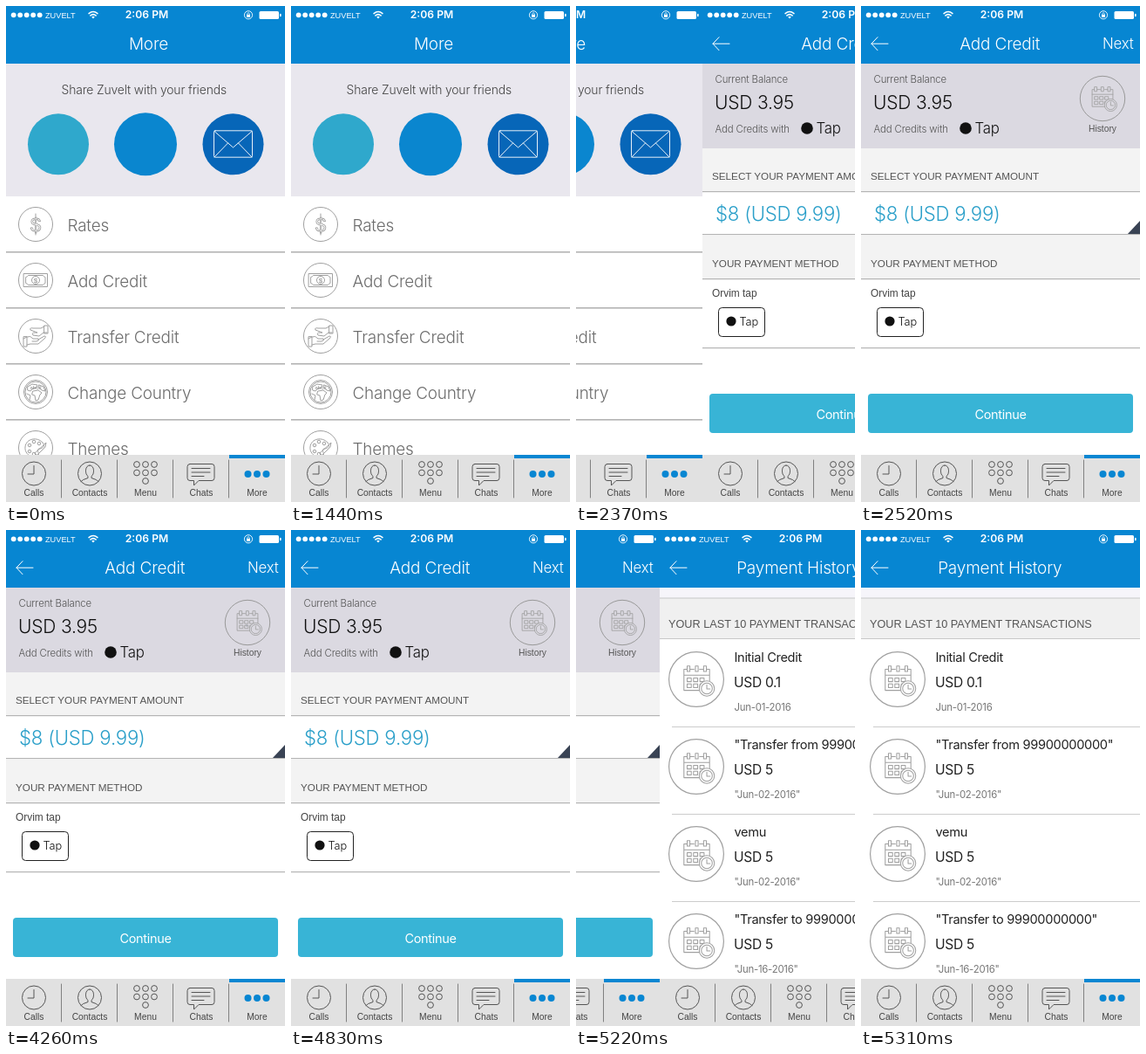
Recreate the animation shown at these times as an HTML page. Size 320x568 px, loop 8100 ms.

```html
<!DOCTYPE html>
<html lang="en">
<head>
<meta charset="utf-8">
<title>Adding credit in a calling app</title>
<style>
  html, body { margin: 0; width: 100%; height: 100%; overflow: hidden; background: #fff; }
  svg { display: block; width: 100%; height: 100%; }
  text { font-family: "Liberation Sans", Arial, sans-serif; fill: #555; }
  .light, .plain { font-family: Inter, "Liberation Sans", sans-serif; font-weight: 300; letter-spacing: -.01em; }
  .plain { font-weight: 400; letter-spacing: -.022em; }
  .line { fill: none; stroke: #a0a0a0; stroke-width: 1; stroke-linejoin: round; stroke-linecap: round; }
</style>
</head>
<body>
<svg viewBox="0 0 320 568">
  <g id="strip"></g>
  <circle id="tap" fill="#999ca3"/>
</svg>
<script>
const LOOP = 8100, STEP = 30, WIDTH = 320, HEADER = 66;
const BLUE = '#0786d2', PANEL = '#e9e7ee', SECTION = '#f3f3f3', RULE = '#b4b4b4';

const rect = (x, y, w, h, fill, more = '') =>
  `<rect x="${x}" y="${y}" width="${w}" height="${h}" fill="${fill}" ${more}/>`;
const dot = (x, y, r, fill, more = '') =>
  `<circle cx="${x}" cy="${y}" r="${r}" fill="${fill}" ${more}/>`;
const ring = (x, y, r, color = '#a0a0a0', width = 1) =>
  dot(x, y, r, 'none', `stroke="${color}" stroke-width="${width}"`);
const line = (d, color = '#a0a0a0', width = 1) =>
  `<path class="line" d="${d}" style="stroke:${color};stroke-width:${width}"/>`;
const text = (x, y, size, str, color = '#555', more = '') =>
  `<text x="${x}" y="${y}" font-size="${size}" style="fill:${color}" ${more}>${str}</text>`;
const light = (x, y, size, str, color, more = '') =>
  text(x, y, size, str, color, 'class="light" ' + more);
const plain = (x, y, size, str, color, more = '') =>
  text(x, y, size, str, color, 'class="plain" ' + more);
const at = (x, y, body, scale = 1) =>
  `<g transform="translate(${x} ${y}) scale(${scale})">${body}</g>`;
const MIDDLE = 'text-anchor="middle"';

function header(title, back) {
  const signal = [0, 1, 2, 3, 4].map(i => dot(8.7 + i * 7.5, 10.3, 2.9, '#fff')).join('');
  const wifi = line('M95 8.6Q100 4.4 105 8.6M96.9 10.9Q100 8.3 103.1 10.9', '#fff', 1.5) +
    '<path d="M98.2 12.5Q100 11 101.8 12.5L100 14.5Z" fill="#fff"/>';
  const lock = ring(278, 10.3, 4.6, '#fff', .9) + rect(276, 9.9, 4, 3, '#fff') +
    line('M276.8 9.8V8.6Q278 6.6 279.2 8.6V9.8', '#fff', .8);
  const battery = rect(290.5, 6, 22.5, 9, '#fff', 'rx="1.6"') +
    rect(314, 8.7, 1.6, 3.6, '#fff', 'rx=".8"');
  return rect(0, 0, WIDTH, HEADER, BLUE) + signal + wifi + lock + battery +
    text(45, 13.8, 9.2, 'ZUVELT', '#fff') +
    `<text class="light" x="161.5" y="14.4" font-size="12.2" ${MIDDLE} style="fill:#fff;font-weight:600;letter-spacing:0">2:06 PM</text>` +
    light(back ? 159.3 : 163.5, 49.6, 19, title, '#fff', MIDDLE) +
    (back ? line('M31 43.2H12M19 35.7L12 43.2L19 50.7', '#fff', 1) : '');
}

function tabBar() {
  const ink = '#555';
  const keys = [525, 534.5].flatMap(y => [150, 160, 170].map(x => ring(x, y, 3.4, ink)))
    .join('') + ring(160, 544, 3.4, ink);
  const labels = ['Calls', 'Contacts', 'Menu', 'Chats', 'More']
    .map((s, i) => text(32 + i * 64, 561.2, 10.3, s, '#444', MIDDLE)).join('');
  return rect(0, 514, WIDTH, 54, '#e1e1e1') + rect(256, 514, 64, 4, BLUE) +
    [64, 128, 192, 256].map(x => line(`M${x - .5} 520V563`, '#808080')).join('') +
    ring(32, 535.5, 13.5, ink) + line('M32 526.5V536H25', ink) +
    ring(96, 535.5, 13.5, ink) +
    line('M96 526C90 526 90.5 536.5 94 538.5V540.5Q87 542.5 86 544.5M96 526C102 526 101.5 536.5 98 538.5V540.5Q105 542.5 106 544.5', ink) +
    keys +
    line('M211 524.5H236Q239 524.5 239 527.5V540.5Q239 543.5 236 543.5H221L215.5 549V543.5H211Q208 543.5 208 540.5V527.5Q208 524.5 211 524.5Z', ink) +
    line('M213 529.5H234M213 534H234M213 538.5H227', ink) +
    [277.5, 288, 298.5].map(x => dot(x, 536, 4, BLUE)).join('') + labels;
}

const calendar = bg =>
  line('M-11 -11H-14V12H14V-11H11M-7 -11H-3M3 -11H7M-14 -4.5H14') +
  [-9, 0, 9].map(x => line(`M${x - 1.5} -14.5h3v6h-3z`)).join('') +
  [-1.5, 5].map(y => [-10.5, -3.5, 3.5].map(x => line(`M${x} ${y}h4.5v4h-4.5z`)).join('')).join('') +
  dot(11, 10, 8.3, bg) + ring(11, 10, 8.3) + ring(11, 10, 6) + line('M11 6V10.5H14.5');

const rowIcons = [
  `<text x="0" y="7.5" font-size="22" ${MIDDLE} style="fill:#fff;stroke:#999;stroke-width:.8">$</text>` +
    line('M0 -12V-9M0 9V12'),
  line('M-13.5 -7.5H13.5V7.5H-13.5ZM-11 -3.5Q-9 -4 -8.5 -5.5H8.5Q9 -4 11 -3.5V3.5Q9 4 8.5 5.5H-8.5Q-9 4 -11 3.5Z') +
    ring(0, 0, 4.5) + text(0, 3, 8, '$', '#888', MIDDLE),
  line('M-14 3L-10 1Q-6 -1 -3 3H3Q5 5 1 6H-4M3 4L10 0Q13 0 10 3L3 9H-6L-10 10M-14 1V12H-10V1Z') +
    line('M13 -4H9L4 0L-3 -1Q-5 -4 -1 -4H2L-6 -7Q-7 -10 -3 -9L6 -9L10 -11M10 -12H14V-3H10Z'),
  ring(0, 0, 13.5) + ring(0, 0, 12) +
    line('M-9 -6L-4 -9L2 -8L1 -5L-3 -4L-6 -1L-9 -2ZM-3 -1L3 -2L7 1L5 3L3 9L0 10L-1 4L-4 3ZM4 -8L9 -6L11 -1L7 -2L4 -5ZM-10 2L-6 4L-7 9') +
    text(0, -3, 6, 'abcd', '#888', MIDDLE),
  line('M3 9C-2 14 -13 8 -12 -1C-11 -11 2 -13 8 -6C12 -1 7 1 4 1C0 2 5 6 3 9Z') +
    [[-7, -3], [-2, -7], [4, -5], [-7, 4], [-2, 7]].map(([x, y]) => ring(x, y, 1.8)).join('') +
    line('M-1 6L9 -3L12 -6L11 -1L2 8Z'),
];

function morePage() {
  const rows = ['Rates', 'Add Credit', 'Transfer Credit', 'Change Country', 'Themes'].map((label, i) => {
    const y = 250 + i * 64;
    return (i ? rect(0, y - 33, WIDTH, 1.6, RULE) : '') + ring(34, y, 19.5) +
      at(34, y, rowIcons[i]) + light(70.5, y + 7.5, 18.9, label, '#6c6c6c');
  }).join('');
  return header('More') + rect(0, HEADER, WIDTH, 218 - HEADER, PANEL) +
    light(63.5, 101, 13.9, 'Share Zuvelt with your friends', '#444') +
    dot(60, 158.3, 35, '#2fa8cc') + dot(160, 158.3, 36, '#0a86cf') + dot(260.5, 158.3, 35, '#0766b8') +
    line('M240 142.8H281Q282.5 142.8 282.5 144.3V171.7Q282.5 173.2 281 173.2H240Q238.5 173.2 238.5 171.7V144.3Q238.5 142.8 240 142.8ZM239 143.5L260.5 162L282 143.5M239 173L254.5 157M282 173L266.5 157', '#fff', .9) +
    rows + tabBar();
}

function creditPage() {
  const grey = '#dbd9e1';
  const section = (y, h, label) => rect(0, y, WIDTH, h, SECTION) +
    rect(0, y + h - 1, WIDTH, 1.2, RULE) + text(11, y + 35.5, 11.7, label);
  return header('Add Credit', true) + light(312.5, 49.3, 16.8, 'Next', '#fff', 'text-anchor="end"') +
    rect(0, HEADER, WIDTH, 163 - HEADER, grey) +
    light(14.5, 87.5, 11.4, 'Current Balance') +
    light(14, 118, 21, 'USD 3.95', '#111') +
    light(14.5, 145, 11.4, 'Add Credits with') +
    dot(120, 140, 6.8, '#111') + light(130.5, 146, 16.8, 'Tap', '#111') +
    ring(277, 106, 25.7, '#999') + at(277, 105, calendar(grey), .85) +
    text(277, 144, 10.3, 'History', '#555', MIDDLE) +
    section(163, 50, 'SELECT YOUR PAYMENT AMOUNT') +
    light(15, 246, 22.2, '$8 (USD 9.99)', '#2a9fc9') +
    '<path d="M320 246V262H305Z" fill="#394354"/>' + rect(0, 261, WIDTH, 1.2, RULE) +
    section(263, 50, 'YOUR PAYMENT METHOD') +
    text(11, 333, 11.9, 'Orvim tap', '#444') +
    rect(18.5, 345.5, 53, 33, '#fff', 'rx="4" stroke="#222"') +
    dot(33, 361, 5.6, '#111') + light(42.5, 366, 12.8, 'Tap', '#111') +
    rect(0, 391, WIDTH, 1.2, RULE) +
    rect(8, 444, 304, 45, '#38b4d6', 'rx="4"') +
    plain(160, 472.5, 14.5, 'Continue', '#fff', MIDDLE) + tabBar();
}

function historyPage() {
  const rows = [
    ['Initial Credit', 'USD 0.1', 'Jun-01-2016'],
    ['"Transfer from 99900000000"', 'USD 5', '"Jun-02-2016"'],
    ['vemu', 'USD 5', '"Jun-02-2016"'],
    ['"Transfer to 99900000000"', 'USD 5', '"Jun-16-2016"'],
  ].map(([title, amount, date], i) => {
    const y = 171 + i * 100;
    return ring(42, y, 31.4, '#a0a0a0', 1.2) + at(42.5, y, calendar('#fff'), 1.05) +
      plain(85.5, y - 20, 14.6, title, '#222') + plain(85, y + 8.5, 15.6, amount, '#222') +
      plain(85.5, y + 36, 11.4, date, '#777') + rect(14, y + 54, 306, 1, '#ccc');
  }).join('');
  return header('Payment History', true) + rect(0, HEADER, WIDTH, 78 - HEADER, '#f6f5fa') +
    rect(0, 78, WIDTH, 46, '#f0f0f0') + rect(0, 77.5, WIDTH, 1, '#c8c8c8') +
    rect(0, 124, WIDTH, 1, '#c8c8c8') +
    text(10, 112, 12.7, 'YOUR LAST 10 PAYMENT TRANSACTIONS') + rows + tabBar();
}

const strip = document.getElementById('strip'), tap = document.getElementById('tap');
strip.innerHTML = [morePage, creditPage, historyPage].map((page, i) => at(i * WIDTH, 0, page())).join('');

const taps = [
  { start: 1410, end: 2070, x: 160, y: 313.5, r: 33 },
  { start: 4230, end: 4830, x: 276, y: 109.5, r: 29 },
];
const progress = (t, start, end) => Math.min(1, Math.max(0, (t - start) / (end - start)));

function draw(now) {
  const t = Math.floor(now % LOOP / STEP) * STEP;
  const scroll = Math.round(WIDTH * (progress(t, 2190, 2520) + progress(t, 5010, 5310)));
  strip.setAttribute('transform', `translate(${-scroll} 0)`);

  const { start, end, x, y, r } = taps[t < 3000 ? 0 : 1];
  const p = progress(t, start, end);
  tap.setAttribute('cx', x);
  tap.setAttribute('cy', y);
  tap.setAttribute('r', r * p);
  tap.setAttribute('opacity', .45 * (1 - p));
  requestAnimationFrame(draw);
}
requestAnimationFrame(draw);
</script>
</body>
</html>
```
